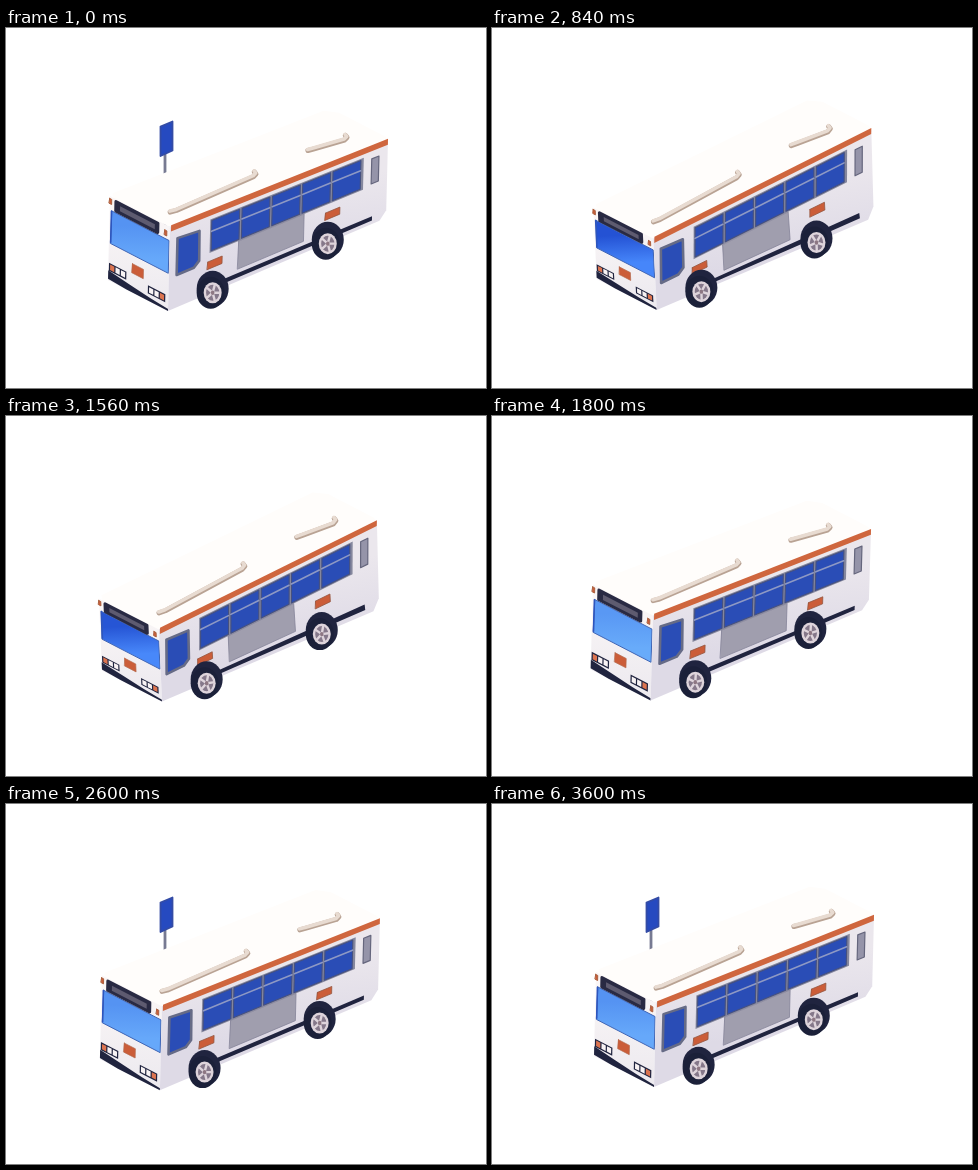
Recreate the animation shown at these times as an HTML page with a canvas. Size 480 by 360 pixels, loop 3640 ms.

```html
<!DOCTYPE html>
<html lang="en">
<head>
<meta charset="utf-8">
<title>Bus ride</title>
<style>
  html, body { margin: 0; width: 100%; height: 100%; overflow: hidden; background: #fff; }
  canvas { display: block; }
</style>
</head>
<body>
<canvas id="stage" width="480" height="360"></canvas>
<script>
const ctx = document.getElementById('stage').getContext('2d');
const LOOP = 3640, RIDE_END = 2600, CLIMB = 0.414;
const DARK = '#20243f', ORANGE = '#cb5d39', GLASS = '#2a4db6';

const clamp = x => Math.min(1, Math.max(0, x));
const mix = (a, b, k) => a + (b - a) * k;
const rgbMix = (a, b, k) => `rgb(${a.map((n, i) => mix(n, b[i], k))})`;

// Smoothly eased value through [time, value] pairs.
const track = (...keys) => t => {
  const i = Math.max(1, keys.findIndex(k => k[0] > t));
  const [t0, a] = keys[i - 1], [t1, b] = keys[i];
  const s = (t - t0) / (t1 - t0);
  return mix(a, b, s * s * (3 - 2 * s));
};
// Travel along the road in px, and nose-up lean of the body.
const slideAt = track([0, 0], [400, -13], [1000, 6], [1560, -6], [2240, 3], [2440, -14], [2800, 0], [LOOP, 0]);
const leanAt = track([0, 0], [400, 1.07], [840, -0.6], [1560, -0.57], [2100, 0.9], [2520, 0], [LOOP, 0]);

// Point on the bus: along its length, across its width, down from the roof.
// grip is how strongly the point follows the lean; the ground line has none.
const busPoint = (slide, lean) => (along, across, down, grip) => {
  const up = 1 - down, sway = lean * grip;
  return [
    162 + 218 * along - 60 * across + 2 * up + slide + 9 * sway,
    283 - 93 * along - 31 * across - up * (84 - 6 * along) - CLIMB * slide + (37 * along - 21) * sway
  ];
};

function trace(points) {
  ctx.beginPath();
  points.forEach(p => ctx.lineTo(...p));
  ctx.lineJoin = ctx.lineCap = 'round';
}
function poly(points, fill, stroke, width = 1) {
  trace(points);
  ctx.closePath();
  ctx.fillStyle = fill;
  ctx.fill();
  if (stroke) { ctx.strokeStyle = stroke; ctx.lineWidth = width; ctx.stroke(); }
}
function line(points, color, width) {
  trace(points);
  ctx.strokeStyle = color;
  ctx.lineWidth = width;
  ctx.stroke();
}
function oval(x, y, rx, ry, fill) {
  ctx.beginPath();
  ctx.ellipse(x, y, rx, ry, 0, 0, 2 * Math.PI);
  ctx.fillStyle = fill;
  ctx.fill();
}
const shape = (face, uv, ...paint) => poly(uv.map(p => face(...p)), ...paint);
const rect = (face, u0, v0, u1, v1, ...paint) =>
  shape(face, [[u0, v0], [u1, v0], [u1, v1], [u0, v1]], ...paint);

function gradient(from, to, first, last) {
  const g = ctx.createLinearGradient(...from, ...to);
  g.addColorStop(0, first);
  g.addColorStop(1, last);
  return g;
}

function drawSign(t) {
  if (t > 470 && t < 2195) return;
  const x = t < 470 ? 174 * (t / 400) ** 2 : -115 * (Math.max(0, RIDE_END - t) / 360) ** 1.5;
  const lit = clamp(Math.abs(x) / 150);
  ctx.save();
  ctx.translate(153.5 + x, 92.5 - CLIMB * x);
  line([[5, 108], [46, 102]], '#4f7ccd', 2);
  poly([[40, 103], [60, 100], [86, 99.5], [82, 103], [62, 105.5]], '#3562bd');
  line([[5.5, 34], [5.5, 108]], '#777a92', 2.8);
  poly([[1, 6], [13, 1], [13, 30], [1, 35.5]],
    rgbMix([38, 74, 192], [84, 144, 250], lit), rgbMix([52, 76, 165], [48, 98, 205], lit), 1.8);
  ctx.restore();
}

function drawWheel([x, y], angle) {
  oval(x, y - 4, 16, 18, DARK);
  oval(x - 2, y, 14, 16, '#1b2039');
  oval(x, y, 9, 10.5, '#ded4db');
  oval(x, y, 6.6, 8, '#85788a');
  for (let i = 0; i < 5; i++) {
    const a = angle + i * Math.PI * 0.4;
    line([[x, y], [x + 6.6 * Math.cos(a), y + 8 * Math.sin(a)]], '#ded4db', 2.4);
  }
  oval(x, y, 1.8, 2.2, '#8d7783');
}

function drawRoof(roof) {
  shape(roof, [[0, 0], [1, 0], [1.01, 0.1], [1.01, 0.85], [0.98, 1], [0.02, 1.03], [-0.01, 0.9]], '#fffdfb');
  const rail = (u0, u1, w0, w1) => {
    const pts = [[u0, w0], [u0 + 0.025, w0 - 0.015], [u1 - 0.02, w1 - 0.02], [u1, w1 + 0.01], [u1 + 0.006, w1 + 0.06]]
      .map(p => roof(...p));
    line(pts, '#b9a394', 5);
    line(pts.map(([x, y]) => [x - 0.3, y - 1]), '#e8dbd1', 3.6);
  };
  rail(0.075, 0.488, 0.27, 0.33);
  rail(0.74, 0.907, 0.39, 0.335);
}

function drawSide(side) {
  shape(side, [[0, 0], [1, 0], [1, 0.9], [0.97, 1], [0, 1]],
    gradient(side(0.5, 0), side(0.55, 1), '#ebe7ed', '#dedae6'));
  rect(side, 0.005, -0.015, 1, 0.06, '#cf663e');

  shape(side, [[0.036, 0.17], [0.137, 0.19], [0.139, 0.55], [0.115, 0.61], [0.036, 0.61]],
    GLASS, '#666b86', 2.6);

  rect(side, 0.186, 0.105, 0.89, 0.51, '#85879d');
  for (let i = 0; i < 5; i++) {
    const u = 0.193 + i * 0.139;
    rect(side, u, 0.125, u + 0.128, 0.49, GLASS, '#46517f', 1.1);
    line([side(u, 0.255), side(u + 0.128, 0.255)], '#8e99c4', 1.6);
  }
  rect(side, 0.318, 0.51, 0.62, 0.85, '#a09eae', '#858398', 0.8);
  rect(side, 0.927, 0.16, 0.96, 0.48, '#9594a9', '#65667d', 1.2);
  for (const u of [0.177, 0.717]) rect(side, u, 0.61, u + 0.068, 0.7, ORANGE, '#94563f', 0.8);
  for (const [u0, u1] of [[0.26, 0.67], [0.79, 0.935]]) rect(side, u0, 0.9, u1, 0.955, DARK);
}

function drawFront(front, lean) {
  rect(front, 0, 0, 1, 1, gradient(front(0.5, 0), front(0.5, 1), '#faf6f6', '#eeebf0'));
  const light = clamp((lean + 0.6) / 0.85);
  rect(front, 0.03, 0.165, 0.99, 0.555,
    gradient(front(0.5, 0.17), front(0.5, 0.56),
      rgbMix([36, 82, 212], [106, 174, 254], light), rgbMix([70, 134, 250], [115, 182, 250], light)),
    '#3f65b5');
  line([front(0.03, 0.17), front(0.03, 0.54)], '#2d55bd', 1.6);

  rect(front, 0.1, 0.03, 0.8, 0.14, '#292a43', '#292a43', 3);
  rect(front, 0.17, 0.06, 0.75, 0.12, '#5e5b70');
  for (const [s, v] of [[-0.01, 0.03], [0.91, 0.065]]) rect(front, s, v, s + 0.04, v + 0.06, ORANGE, '#a9603f');

  rect(front, 0.39, 0.66, 0.58, 0.77, ORANGE, '#b3694c', 0.7);
  for (const [s, v, orange] of [[0.01, 0.79, 0], [0.66, 0.82, 2]]) {
    rect(front, s, v, s + 0.29, v + 0.095, DARK);
    for (let i = 0; i < 3; i++) {
      const left = s + 0.02 + i * 0.09;
      rect(front, left, v + 0.015, left + 0.07, v + 0.08, i === orange ? '#dc7450' : '#f8f3f4');
    }
  }
  shape(front, [[0, 0.885], [0.35, 0.92], [0.7, 0.955], [1, 0.975], [1, 1], [0.3, 1], [0, 0.985]], DARK);
}

// Fraction of the ride covered: speed up, cruise, slow down.
function progress(t) {
  const up = 480, down = 2100;
  const total = (RIDE_END + down - up) / 2;
  if (t < up) return t * t / (2 * up) / total;
  if (t < down) return (t - up / 2) / total;
  return 1 - Math.max(0, RIDE_END - t) ** 2 / (2 * (RIDE_END - down)) / total;
}

function draw(t) {
  const lean = leanAt(t), angle = -progress(t) * Math.PI * 32;
  const point = busPoint(slideAt(t), lean);
  ctx.fillStyle = '#fff';
  ctx.fillRect(0, 0, 480, 360);
  drawSign(t);
  drawRoof((u, w) => point(u, w, 0, 1));
  drawFront((s, v) => point(0, 1 - s, v, 1 - v), lean);
  drawSide((u, v) => point(u, 0, v, 1 - v ** 3));
  for (const u of [0.205, 0.733]) drawWheel(point(u, 0, 1.01, 0), angle);
}

const start = performance.now();
function tick() {
  draw((performance.now() - start) % LOOP);
  requestAnimationFrame(tick);
}
tick();
</script>
</body>
</html>
```
